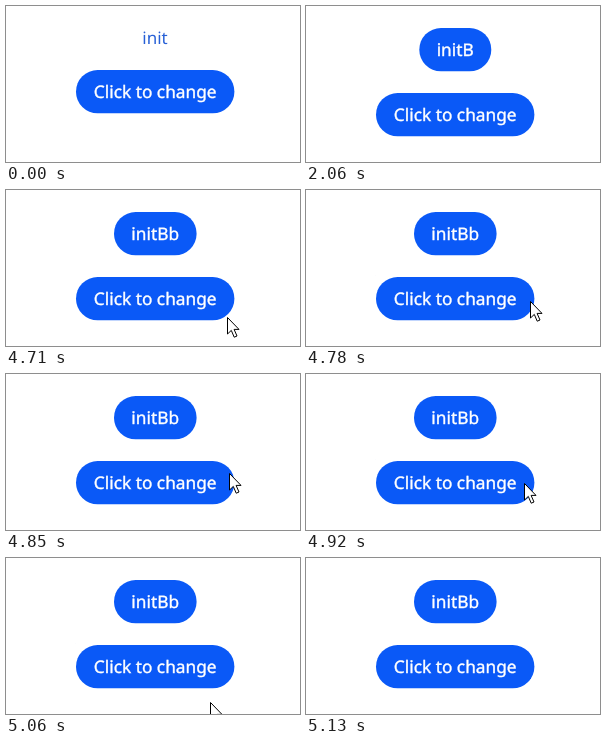
Animation, 294 px wide and 156 px high, one loop 7.86 s. Source, as an HTML page:

```html
<!DOCTYPE html>
<html lang="en">
<head>
<meta charset="utf-8">
<style>
  html, body { margin: 0; width: 100%; height: 100%; overflow: hidden; background: #fff; }
  svg { display: block; width: 294px; height: 156px; }
  text {
    font: 17.3px "Noto Sans", "Open Sans", sans-serif;
    text-anchor: middle; text-rendering: geometricPrecision;
    fill: #fff; stroke: #fff; stroke-width: .4px;
  }
  rect { fill: #0a59f7; }
  #plain { font-size: 17px; fill: #2760d6; stroke: none; }
</style>
</head>
<body>
<svg viewBox="0 0 294 156">
  <text id="plain" x="149" y="38">init</text>
  <g id="top">
    <rect id="pill" y="22" height="43.3" rx="21.65"/>
    <text id="label" x="149.2" y="50"></text>
  </g>
  <g id="button">
    <rect x="70" y="64" width="158.4" height="43.3" rx="21.65"/>
    <text x="149.2" y="92">Click to change</text>
  </g>
  <path id="cursor" d="M.5 .5V17L4.3 13.4L7.2 20.2L10 19L7.1 12.4H12Z"
        fill="#fff" stroke="#000" stroke-linejoin="miter"/>
</svg>
<script>
const LOOP = 7860, FIRST = 2060, SECOND = 4710;
const POINTER_IN = 4640, STEP = 70;
// Cursor tip at each step while it crosses the stage
const tips = [[217, 147], [221, 127], [224, 111], [223, 99], [218, 109], [210, 125], [204, 144]];
const $ = id => document.getElementById(id);
const show = (el, on) => el.setAttribute("visibility", on ? "visible" : "hidden");

function draw(t) {
  const changed = t >= FIRST, twice = t >= SECOND;
  show($("plain"), !changed);
  show($("top"), changed);
  $("button").setAttribute("transform", `translate(0 ${changed ? 23 : 0})`);

  const width = twice ? 82.6 : 72;
  $("pill").setAttribute("x", 149.3 - width / 2);
  $("pill").setAttribute("width", width);
  $("label").textContent = twice ? "initBb" : "initB";

  const tip = tips[Math.floor((t - POINTER_IN) / STEP)];
  show($("cursor"), !!tip);
  if (tip) $("cursor").setAttribute("transform", `translate(${tip})`);
}

const start = performance.now();
function tick() {
  draw((performance.now() - start) % LOOP);
  requestAnimationFrame(tick);
}
tick();
</script>
</body>
</html>
```
